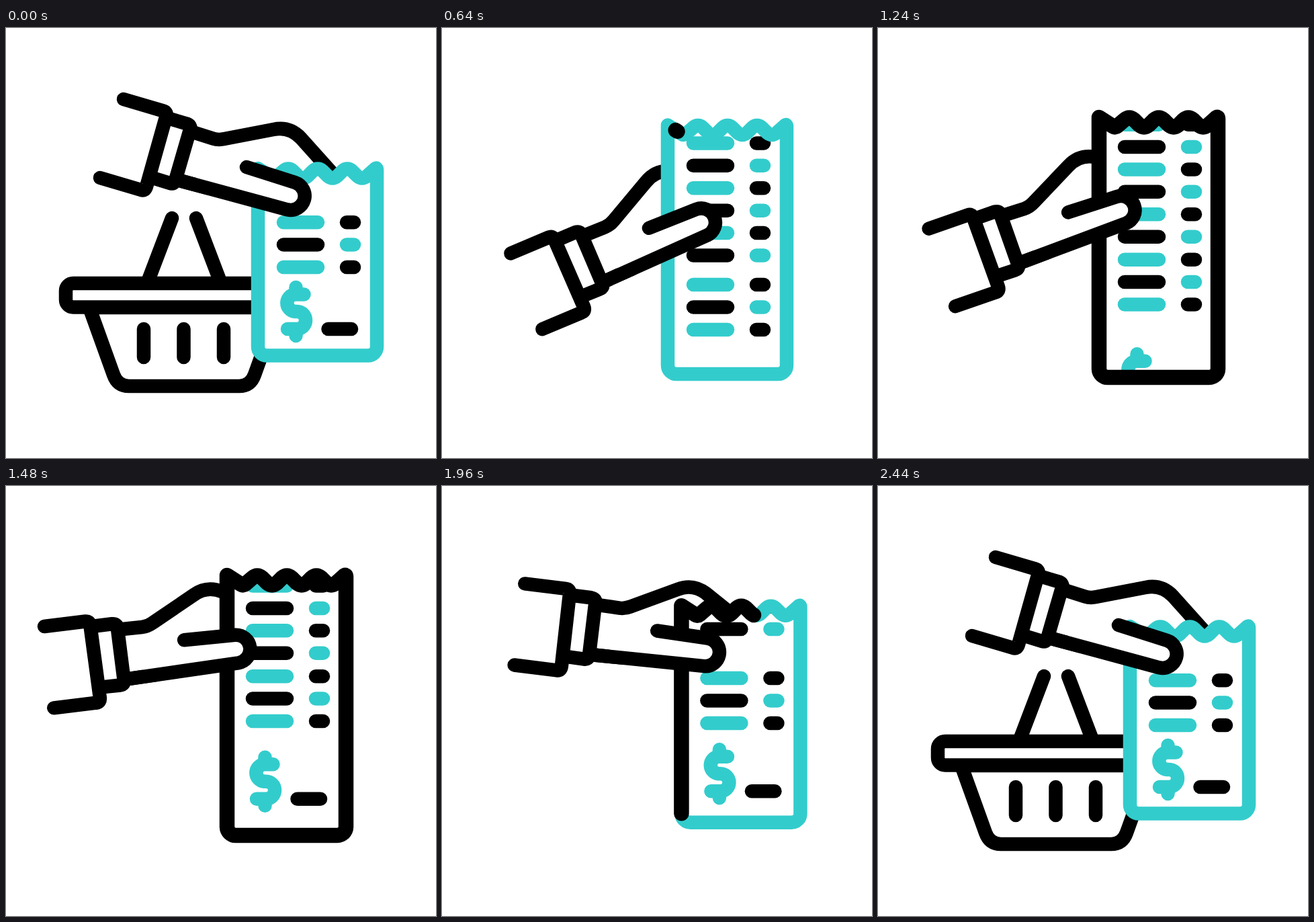
Recreate the animation shown at these times as an HTML page. Size 640 by 640 pixels, loop 2.8 s.

```html
<!DOCTYPE html>
<html lang="en">
<head>
<meta charset="utf-8">
<title>Receipt</title>
<style>
  html, body { margin: 0; width: 100%; height: 100%; overflow: hidden; background: #fff; }
  svg { display: block; width: 100vw; height: 100vh; }
  .line { fill: none; stroke: #000; stroke-width: 20.5; stroke-linecap: round; stroke-linejoin: round; }
  .solid { fill: #fff; }
  .teal { stroke: #3cc; }
  #trace { stroke-width: 22.5; }
</style>
</head>
<body>
<svg viewBox="0 0 640 640">
  <defs><clipPath id="clip"><path id="clipShape"/></clipPath></defs>

  <g id="basket">
    <path class="line" d="M247 283L212 375M283 283L318 375"/>
    <path class="line solid" d="M124 416L160 516Q166 533 183 533H347Q364 533 370 516L406 416Z"/>
    <rect class="line solid" x="89" y="380" width="351" height="35.5" rx="11"/>
    <path class="line" d="M205 448V490M264.5 448V490M324 448V490"/>
  </g>

  <g class="hand">
    <path fill="#fff" d="M278 155L308 164.500Q316 167 325 165L398 151Q422 146 439 164L500 232L424 271L262 228Z"/>
    <path class="line" d="M278 155L308 164.500Q316 167 325 165L398 151Q422 146 439 164L500 232"/>
    <path class="line" d="M262 228L300 238.200"/>
    <path class="line solid" d="M240 134L269 142.500Q276 145 274 151L252 227Q250 233 244 231L218 223"/>
    <path class="line solid" d="M175 106L234 123.300Q240 125 238.500 131L209 236Q207 243 201 241L140 223"/>
  </g>

  <path id="paper" fill="#fff"/>
  <g clip-path="url(#clip)">
    <g id="history"></g>
    <g id="items"></g>
    <g id="total">
      <path class="line teal" d="M443.500 396.500H430A12.800 12.800 0 0 0 430 422H433A13 13 0 0 1 433 448H419M431.500 386V396M431.500 448V458"/>
      <path class="line" d="M479.500 448H514"/>
    </g>
  </g>
  <path id="edge" class="line teal"/>
  <path id="trace" class="line" pathLength="1"/>

  <g class="hand">
    <path class="line solid" d="M358 207L430.300 230A21 21 0 0 1 418.600 270.300L262 228"/>
  </g>
</svg>
<script>
  const LOOP = 2800, STEP = 40;
  const $ = id => document.getElementById(id);
  const hands = document.querySelectorAll('.hand');

  // Offsets from rest: while the paper is gripped low, then after the hand slides up.
  const LOW  = { x: -59, y: 107, turn: -46.3, items: 109.5, total: 171, history: 175 };
  const HIGH = { x: -93.4, y: 21, turn: -23, items: -7.7, total: 15.5, history: 57 };

  const row = (y, dark) =>
    `<path class="line ${dark ? '' : 'teal'}" d="M413 ${y}H464"/>` +
    `<path class="line ${dark ? 'teal' : ''}" d="M507 ${y}H518"/>`;
  const rows = (n, last, darkLast) =>
    Array.from({ length: n }, (_, i) => row(last - i * 33.4, i % 2 ? !darkLast : darkLast)).join('');
  $('history').innerHTML = rows(6, 190, true);
  $('items').innerHTML = rows(3, 356, false);

  // Symmetric cubic bezier (.7, 0, .3, 1)
  function ease(x) {
    if (x <= 0) return 0;
    if (x >= 1) return 1;
    let lo = 0, hi = 1, s = 0.5;
    for (let i = 0; i < 24; i++) {
      s = (lo + hi) / 2;
      const px = 2.1 * s * (1 - s) ** 2 + 0.9 * s * s * (1 - s) + s ** 3;
      if (px < x) lo = s; else hi = s;
    }
    return s * s * (3 - 2 * s);
  }
  const phase = (t, from, to) => ease((t - from) / (to - from));

  // Linear track through [time, ...values]
  function track(t, keys) {
    if (t <= keys[0][0]) return keys[0].slice(1);
    for (let i = 1; i < keys.length; i++) {
      const a = keys[i - 1], b = keys[i];
      if (t <= b[0]) {
        const k = (t - a[0]) / (b[0] - a[0]);
        return a.slice(1).map((v, j) => v + (b[j + 1] - v) * k);
      }
    }
    return keys[keys.length - 1].slice(1);
  }

  const BASKET = [
    [160, 0, 0, 1], [240, 12, -7, 1], [360, 38, -28, 1], [400, 46, -42, 0.9], [540, 72, -95, 0],
    [1960, 75, -125, 0], [2120, 53, -66, 1], [2160, 46, -51, 1], [2240, 28, -28, 1],
    [2320, 11, -11, 1], [2400, 1.2, -1, 1], [2440, 0, 0, 1]
  ];

  function receipt(x, top, bottom) {
    const p = (dx, dy) => `${x + dx} ${top + dy}`;
    let d = `M${p(0, 0)}L${p(21, 13.5)}Q${p(24, 15.5)} ${p(27, 13)}`;
    for (let peak = 45; peak < 177; peak += 44) {
      const dip = peak + 22;
      d += `L${p(peak - 7, 3.5)}Q${p(peak, -2.5)} ${p(peak + 7, 3.5)}`;
      d += `L${p(dip - 7, 11.5)}Q${p(dip, 17.5)} ${p(dip + 7, 11.5)}`;
    }
    return d + `L${p(175, 0)}Q${p(177, -1)} ${p(177, 2)}V${bottom - 13}` +
      `a13 13 0 0 1 -13 13H${x + 13}a13 13 0 0 1 -13 -13Z`;
  }

  function draw(t) {
    const grab = phase(t, 240, 855);
    const slide = phase(t, 930, 1565);
    const back = phase(t, 1600, 2280);
    const low = grab - slide, high = slide - back, open = grab - back;
    const mix = key => low * LOW[key] + high * HIGH[key];

    const dx = -46 * open;
    const d = receipt(375 + dx, 209 - 76 * open, 487.5 + 32.5 * open);
    for (const id of ['clipShape', 'paper', 'edge', 'trace']) $(id).setAttribute('d', d);
    for (const id of ['history', 'items', 'total'])
      $(id).setAttribute('transform', `translate(${dx} ${mix(id)})`);
    for (const hand of hands)
      hand.setAttribute('transform', `translate(${mix('x')} ${mix('y')}) rotate(${mix('turn')} 358 207)`);

    const [bx, by, size] = track(t, BASKET);
    $('basket').setAttribute('transform',
      `translate(${400 + bx} ${430 + by}) scale(${size}) translate(-400 -430)`);
    $('basket').style.display = size > 0.01 ? '' : 'none';

    // Black outline: its tail drifts backwards while the length grows and shrinks.
    const length = phase(t, 600, 1240) - phase(t, 1513, 2370);
    const start = 1.0125 - 0.000238 * (t - 640);
    const trace = $('trace').style;
    trace.display = length > 0.001 ? '' : 'none';
    trace.strokeDasharray = length < 0.999 ? `${length} ${1 - length}` : 'none';
    trace.strokeDashoffset = 1 - start;
  }

  const begin = performance.now();
  function tick() {
    const t = (performance.now() - begin) % LOOP;
    draw(Math.floor(t / STEP) * STEP);
    requestAnimationFrame(tick);
  }
  draw(0);
  requestAnimationFrame(tick);
</script>
</body>
</html>
```
